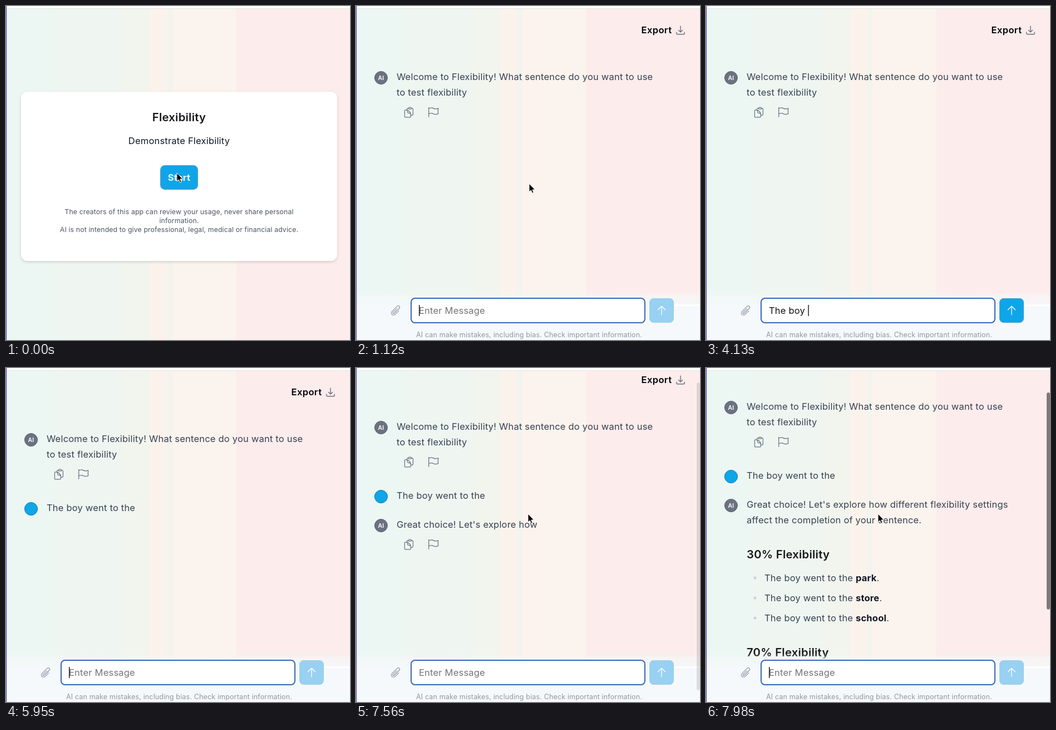
An HTML page for the animation above (8000 ms loop, 618 px wide and 600 px high).

```html
<!DOCTYPE html>
<html lang="en">
<head>
<meta charset="utf-8">
<title>Flexibility</title>
<style>
  html, body { margin: 0; width: 100%; height: 100%; overflow: hidden; background: #fff; }
  svg { display: block; width: 618px; height: 600px; }
  text { font: 400 16.5px Inter, sans-serif; letter-spacing: .012em; fill: #374151; white-space: pre; }
  .mid { text-anchor: middle; }
  .small { font-size: 12.25px; fill: #4b5563; }
  .head { font-size: 20.3px; font-weight: 600; fill: #18181b; }
  .strong { font-weight: 700; fill: #111827; }
  .icon { fill: none; stroke: #6b7280; stroke-width: 1.35; stroke-linecap: round; stroke-linejoin: round; }
</style>
</head>
<body>
<svg id="stage" viewBox="0 0 618 600">
  <defs>
    <linearGradient id="fade" x1="0" y1="512" x2="0" y2="600" gradientUnits="userSpaceOnUse">
      <stop offset="0" stop-color="#f5f9fc" stop-opacity="0"/>
      <stop offset=".06" stop-color="#f5f8f8" stop-opacity=".2"/>
      <stop offset=".1" stop-color="#f5f8f8" stop-opacity=".65"/>
      <stop offset=".27" stop-color="#f5f8fa" stop-opacity=".75"/>
      <stop offset=".3" stop-color="#f5f9fc"/>
    </linearGradient>
    <filter id="shadow" x="-5%" y="-5%" width="110%" height="115%">
      <feDropShadow dx="0" dy="2" stdDeviation="2.5" flood-color="#000" flood-opacity=".15"/>
    </filter>
    <g id="tools" class="icon">
      <path transform="translate(84 180) scale(.91)" d="M8.25 7.5V6.108c0-1.135.845-2.098 1.976-2.192.373-.03.748-.057 1.123-.08M15.75 18H18a2.25 2.25 0 0 0 2.25-2.25V6.108c0-1.135-.845-2.098-1.976-2.192a48.4 48.4 0 0 0-1.123-.08M15.75 18.75v-1.875a3.375 3.375 0 0 0-3.375-3.375h-1.5a1.125 1.125 0 0 1-1.125-1.125v-1.5A3.375 3.375 0 0 0 6.375 7.5H5.25m11.9-3.664A2.25 2.25 0 0 0 15 2.25h-1.5a2.25 2.25 0 0 0-2.15 1.586m5.8 0c.065.21.1.433.1.664v.75h-6V4.5c0-.231.035-.454.1-.664M6.75 7.5H4.875c-.621 0-1.125.504-1.125 1.125v12c0 .621.504 1.125 1.125 1.125h9.75c.621 0 1.125-.504 1.125-1.125V16.5a9 9 0 0 0-9-9Z"/>
      <path transform="translate(127.9 179.7) scale(.93)" d="M3 3v18M3 15l2.77-.693a9 9 0 0 1 6.208.682l.108.054a9 9 0 0 0 6.086.71l3.114-.732a48.5 48.5 0 0 1-.005-10.5l-3.11.732a9 9 0 0 1-6.085-.711l-.108-.054a9 9 0 0 0-6.208-.682L3 4.5"/>
    </g>
    <g id="ai">
      <circle cx="45" cy="129" r="11.5" fill="#6b7280" stroke="#596070"/>
      <text x="45" y="132.7" class="mid" style="font-size:10.5px;font-weight:600;fill:#fff">AI</text>
    </g>
  </defs>

  <g id="bands"></g>

  <g id="intro">
    <rect x="27" y="154" width="568" height="304" rx="12" fill="#fff" filter="url(#shadow)"/>
    <text x="311" y="207" class="mid head">Flexibility</text>
    <text x="311" y="247.5" class="mid" style="fill:#111827">Demonstrate Flexibility</text>
    <rect id="start" x="277.8" y="286.8" width="66.4" height="42.4" rx="7.5" stroke-width="1.6"/>
    <text x="311" y="314" class="mid" style="font-weight:700;fill:#eaf6fd">Start</text>
    <text x="311" y="374" class="mid small">The creators of this app can review your usage, never share personal</text>
    <text x="311" y="390" class="mid small">information.</text>
    <text x="311" y="406" class="mid small">AI is not intended to give professional, legal, medical or financial advice.</text>
  </g>

  <g id="chat">
    <g id="scroll">
      <text x="512.5" y="48.5" style="font-weight:600;fill:#000;letter-spacing:.025em">Export</text>
      <path class="icon" style="stroke-width:1.8" transform="translate(573.4 33.9) scale(.8)" d="M3 16.5v2.25A2.25 2.25 0 0 0 5.25 21h13.5A2.25 2.25 0 0 0 21 18.75V16.5M16.5 12 12 16.5 7.5 12m4.5 4.5V3"/>
      <use href="#ai"/>
      <text x="73" y="132.5">Welcome to Flexibility! What sentence do you want to use</text>
      <text x="73" y="160.5">to test flexibility</text>
      <use href="#tools"/>
      <g id="sent">
        <circle cx="45" cy="253" r="11.6" fill="#0ea5e9" stroke="#1a80b0"/>
        <text x="73" y="256.5">The boy went to the</text>
      </g>
      <g id="reply"><use href="#ai" y="176"/></g>
      <use id="replyTools" href="#tools"/>
    </g>
    <rect x="1" y="512" width="617" height="88" fill="url(#fade)"/>
    <rect x="572" y="536" width="46" height="3" fill="#fff"/>
    <path class="icon" style="stroke:#8a94a3" transform="translate(60.8 536.6) scale(.87)" d="m18.375 12.739-7.693 7.693a4.5 4.5 0 0 1-6.364-6.364l10.94-10.94A3 3 0 1 1 19.5 7.372L8.552 18.32m5.699-9.941-7.81 7.81a1.5 1.5 0 0 0 2.112 2.13"/>
    <rect x="99" y="525" width="420" height="44" rx="7" fill="#fff" stroke="#3766b9" stroke-width="2"/>
    <text id="entry" x="113" y="552.5"></text>
    <rect id="caret" y="537" width="1.4" height="20" fill="#111"/>
    <rect id="send" x="527.6" y="525.6" width="42.8" height="42.8" rx="7" stroke-width="1.2"/>
    <path class="icon" style="stroke:#fff;stroke-width:1.5" transform="translate(538.6 536.6) scale(.87)" d="M4.5 10.5 12 3l7.5 7.5M12 3v18"/>
    <text x="311" y="595" class="mid small" style="font-size:12.5px;fill:#9097a1">AI can make mistakes, including bias. Check important information.</text>
    <rect id="thumb" x="612" width="6" rx="3" fill="#736b6c"/>
  </g>

  <rect width="618" height="4" fill="#fff"/>
  <rect y="4" width="618" height="1" fill="#e3e5e5"/>
  <rect width="1.2" height="600" fill="#5f58b8"/>

  <path id="arrow" d="M0 0V15L3.4 11.9L5.7 17.3L8.1 16.3L5.9 11H10.6Z" fill="#000" stroke="#fff"/>
  <g id="beam" fill="none">
    <path d="M-3.5 -8Q0 -8 0 -5.5Q0 -8 3.5 -8M0 -6V6M-3.5 8Q0 8 0 5.5Q0 8 3.5 8M-2 2H2" stroke="#fff" stroke-width="3"/>
    <path d="M-3.5 -8Q0 -8 0 -5.5Q0 -8 3.5 -8M0 -6V6M-3.5 8Q0 8 0 5.5Q0 8 3.5 8M-2 2H2" stroke="#000" stroke-width="1.3"/>
  </g>
</svg>
<script>
const LOOP = 8000, TICK = 70;
const $ = id => document.getElementById(id);
const set = (el, attrs) => { for (const k in attrs) el.setAttribute(k, attrs[k]); };
const show = (el, on) => { el.style.display = on ? '' : 'none'; };

function add(parent, tag, attrs = {}) {
  const el = document.createElementNS('http://www.w3.org/2000/svg', tag);
  set(el, attrs);
  return parent.appendChild(el);
}

// Background: [left edge, colour]
const bands = [[0, '#ecf7f3'], [87, '#eff5f1'], [209, '#f2f5ee'], [260, '#fcf2ec'],
  [289, '#f2f4ed'], [299, '#fbf3ed'], [414, '#fcecec']];
bands.forEach(([x, fill], i) => {
  const end = i + 1 < bands.length ? bands[i + 1][0] : 618;
  add($('bands'), 'rect', { x, width: end - x, height: 600, fill });
});

// Reply lines: [baseline, kind, text]
const reply = [
  [308.5, 'text', "Great choice! Let's explore how different flexibility settings"],
  [336.5, 'text', 'affect the completion of your sentence.'],
  [400, 'head', '30% Flexibility'],
  [440.5, 'item', 'The boy went to the park.'],
  [476.5, 'item', 'The boy went to the store.'],
  [512.5, 'item', 'The boy went to the school.'],
  [576, 'head', '70% Flexibility']
].map(([y, kind, text]) => {
  const item = kind === 'item';
  const g = add($('reply'), 'g');
  if (item) add(g, 'circle', { cx: 88, cy: y - 5.5, r: 2.6, fill: '#cdd3d8' });
  const el = add(g, 'text', { x: item ? 105 : 73, y, class: kind });
  const spans = ['', 'strong', ''].map(c => add(el, 'tspan', { class: c }));
  return { y, item, g, spans, words: text.split(' ') };
});

// Step tables: [time, value]
const typed = [[0, 0], [2730, 1], [2870, 2], [2940, 3], [3080, 4], [3220, 5], [3360, 6], [3640, 7],
  [4130, 8], [4270, 9], [4410, 10], [4550, 11], [4690, 12],
  [5110, 13], [5250, 14], [5320, 15], [5460, 16], [5530, 18], [5670, 19], [5950, 0]];
const streamed = [[0, 0], [7210, 1], [7280, 2], [7350, 3], [7490, 4], [7560, 5], [7630, 10],
  [7700, 14], [7770, 18], [7840, 24], [7910, 30], [7980, 36]];

// Motion tables: [time, value]
const pointerX = [[0, 307], [70, 307], [560, 311], [1400, 311], [2100, 235], [6440, 250], [6860, 309]];
const pointerY = [[0, 300], [70, 300], [560, 313], [1050, 313], [1120, 319], [1400, 319], [2100, 536],
  [6370, 536], [6440, 500], [6860, 262]];
const scrollY = [[6370, 0], [6860, 22], [7630, 22], [7980, 58]];
const height = [[7560, 643], [7980, 911]];
const thumbAlpha = [[6370, 0], [6510, .9], [7350, .9], [7560, .2], [7700, .9]];

const step = (table, t) => table.filter(k => k[0] <= t).pop()[1];

function ease(table, t) {
  const i = table.findIndex(k => k[0] > t);
  if (i === 0) return table[0][1];
  if (i < 0) return table[table.length - 1][1];
  const [t0, a] = table[i - 1], [t1, b] = table[i];
  const p = (t - t0) / (t1 - t0);
  return a + (b - a) * p * p * (3 - 2 * p);
}

function paintButton(el, active) {
  set(el, active ? { fill: '#0ea5e9', stroke: '#439ecb' } : { fill: '#98d1f1', stroke: '#9ecfea' });
}

function drawReply(count) {
  let last = reply[0].y;
  for (const { y, item, g, spans, words } of reply) {
    const n = Math.max(0, Math.min(count, words.length));
    count -= words.length;
    show(g, n > 0);
    if (n) last = y;
    const bold = item && n === words.length;
    const plain = words.slice(0, bold ? n - 1 : n).join(' ');
    spans[0].textContent = bold ? plain + ' ' : plain;
    spans[1].textContent = bold ? words[n - 1].slice(0, -1) : '';
    spans[2].textContent = bold ? '.' : '';
  }
  set($('replyTools'), { y: last - 160.5 });
}

function drawEntry(t) {
  const n = step(typed, t), entry = $('entry');
  entry.textContent = n ? 'The boy went to the'.slice(0, n) : 'Enter Message';
  entry.style.fill = n ? '#111' : '#757575';
  set($('caret'), { x: n ? 113.5 + entry.getComputedTextLength() : 113 });
  const blink = (t - (t < 2730 ? 1120 : 5950)) % 1000 < 490;
  show($('caret'), n > 0 || blink);
  paintButton($('send'), n > 0);
}

function drawPointer(t) {
  const x = ease(pointerX, t), y = ease(pointerY, t);
  const visible = t < 2450 || t >= 6440, overInput = y > 524;
  show($('arrow'), visible && !overInput);
  show($('beam'), visible && overInput);
  for (const id of ['arrow', 'beam']) set($(id), { transform: `translate(${x} ${y})` });
}

function render(t) {
  const chatting = t >= 1120;
  show($('intro'), !chatting);
  show($('chat'), chatting);
  paintButton($('start'), t < 840);
  drawPointer(t);
  if (!chatting) return;

  const words = step(streamed, t), top = ease(scrollY, t), ratio = 596 / ease(height, t);
  set($('scroll'), { transform: `translate(0 ${-top})` });
  show($('sent'), t >= 5950);
  show($('reply'), t >= 6440);
  show($('replyTools'), words > 0);
  drawReply(words);
  drawEntry(t);
  set($('thumb'), { y: 6 + top * ratio, height: 596 * ratio, opacity: ease(thumbAlpha, t) });
}

const begin = performance.now();
function loop() {
  const t = (performance.now() - begin) % LOOP;
  render(Math.floor(t / TICK) * TICK);
  requestAnimationFrame(loop);
}
loop();
</script>
</body>
</html>
```
